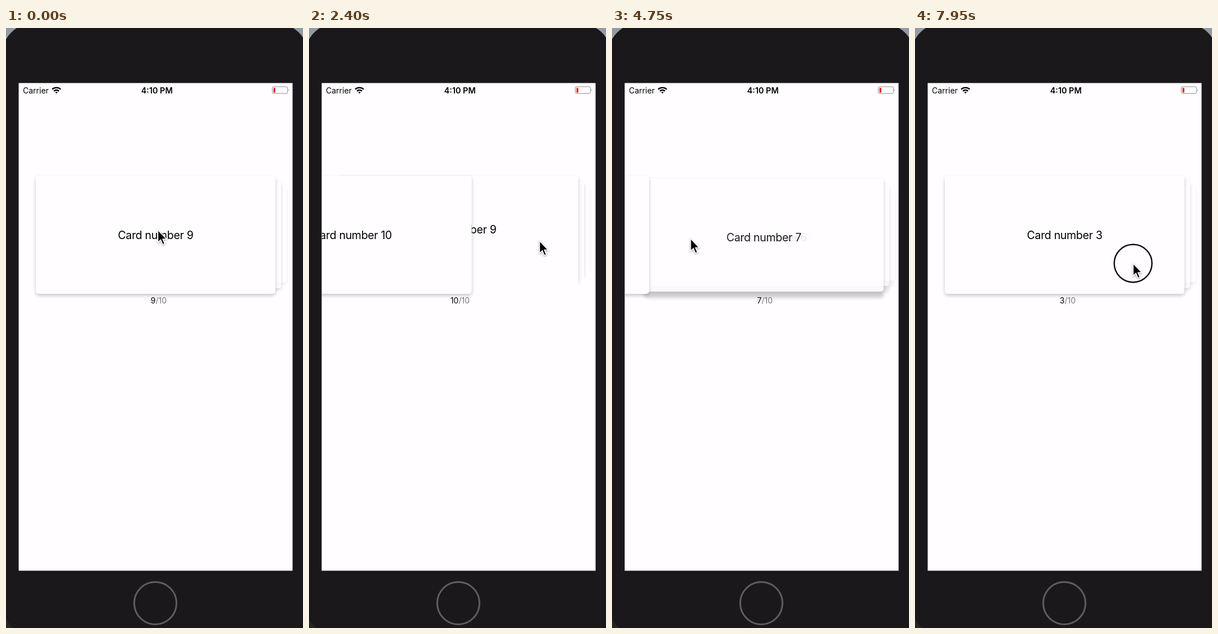
Write an HTML page that moves like this. It is 527 by 1063 pixels and loops after 8000 ms.

```html
<!DOCTYPE html>
<html lang="en">
<head>
<meta charset="utf-8">
<title>Card stack</title>
<style>
  html, body { margin: 0; width: 527px; height: 1063px; overflow: hidden; background: #1a181b; }
  body { position: relative; font-family: Inter, sans-serif; color: #000; }
  svg { position: absolute; left: 0; top: 0; }
  #screen { position: absolute; left: 23px; top: 98px; width: 485px; height: 863px; overflow: hidden; }
  .card, .card * { position: absolute; left: 0; top: 0; width: 425px; border-radius: 5px; }
  .shade { background: #000; opacity: .22; filter: blur(3px); margin-top: 3px; }
  .face { background: #fffdff; }
  .card .label { height: 24px; line-height: 24px; margin-top: -11.5px; text-align: center;
    font-size: 19.5px; letter-spacing: -.32px; }
  #counter { position: absolute; right: 223px; top: 375px; line-height: 20px; font-size: 14px; }
  #counter span { color: #777; }
</style>
</head>
<body>
<svg width="527" height="1063">
  <path d="M0 0H19Q7 8 0 20ZM527 0H509Q520 6 527 17Z" fill="#929ba5"/>
  <path d="M0 1046Q4 1056 13 1063H0Z" fill="#24271f"/>
  <rect x="22.5" y="97.5" width="486" height="864" fill="#fffdff"/>
  <circle cx="265" cy="1019" r="37.5" fill="none" stroke="#5f5d60" stroke-width="3"/>
</svg>
<div id="screen"><div id="counter"><b style="font-weight:400"></b><span>/10</span></div></div>
<svg width="527" height="1063">
  <g font-size="14">
    <text x="30" y="116">Carrier</text>
    <text x="267.7" y="116" text-anchor="middle" font-size="14.4" font-weight="600">4:10 PM</text>
  </g>
  <path d="M82 108.6A11 11 0 0 1 97 108.6M85 111.8A6.6 6.6 0 0 1 94 111.8"
    fill="none" stroke="#000" stroke-width="2.4"/>
  <path d="M87.2 113.8Q89.5 112 91.8 113.8L89.5 116.3Z"/>
  <rect x="472.5" y="104" width="27" height="12" rx="2.5" fill="none" stroke="#8b8a8c"/>
  <rect x="474.5" y="106" width="3.5" height="8.5" rx="1" fill="#e5302c"/>
  <path d="M501 108q2 2 0 4Z" fill="#8b8a8c"/>
  <g id="pointer">
    <circle id="ring" r="33.5" fill="none" stroke="#0c0a0d" stroke-width="2.4"/>
    <path d="M0 0V22.2L5 17.6L8.6 26L12.2 24.4L8.7 16.3H15.4Z" fill="#000" stroke="#fff"
      stroke-width="1.6" style="filter:drop-shadow(0 1.5px 1.5px #0006)"/>
  </g>
</svg>
<script>
const LOOP = 8000, SETTLE = 300, OFF = -485, COUNT = 10, FIRST = 9, FINAL_PRESS = 7925;
const HOME = { x: 30, y: 164, h: 209 }, STEP = 10;
const $ = id => document.getElementById(id);
const clamp = v => Math.min(1, Math.max(0, v));
const ease = v => { v = clamp(v); return v * v * (3 - 2 * v); };
const easeOut = v => 1 - (1 - clamp(v)) ** 2;
const mix = (a, b, v) => a + (b - a) * v;

const dismiss = (release, from, to, y) => ({ step: -1, press: release - 230, release, from, to, y });
const bringBack = release => ({ step: 1, press: release - 400, release, from: 114, to: 409, y: 377 });

// One dismissal, two cards brought back, then a steady run whose last two swipes stop short
const swipes = [
  dismiss(480, 285, -14, 357), bringBack(1500), bringBack(2390),
  ...Array.from({ length: 7 }, (_, n) => dismiss(
    3320 + 630 * n, 332 + 44 * Math.cos((n - 5) * Math.PI / 3), n < 5 ? -13 : 102, 373)),
];

// Between swipes the pointer waits, then hurries to the next starting place
const track = [{ t: -50, x: 264, y: 358 }];
for (const { press, release, from, to, y } of swipes) track.push(
  { ...track.at(-1), t: press - 270 }, { t: press - 120, x: from, y },
  { t: press, x: from, y }, { t: release, x: to, y });
track.push({ ...track.at(-1), t: 7230 }, { t: 7390, x: 502, y: 398 },
  { t: FINAL_PRESS, x: 387, y: 417 }, { t: LOOP, x: 387, y: 417 });

function pointerAt(t) {
  const i = track.findIndex(p => p.t > t), a = track[i - 1], b = track[i];
  const v = easeOut((t - a.t) / (b.t - a.t));
  return { x: mix(a.x, b.x, v), y: mix(a.y, b.y, v) };
}

const cards = Array.from({ length: COUNT }, (_, i) => {
  const root = document.createElement('div');
  root.className = 'card';
  root.innerHTML = `<div class="shade"></div><div class="face"></div><div class="label">Card number ${i + 1}</div>`;
  $('screen').append(root);
  const [shade, face, label] = root.children;
  return { root, shade, face, label };
});

// depth is the animated place in the stack, rank the place it settles in
function place({ root, shade, face, label }, dx, depth, rank) {
  const alpha = clamp(1 - depth / 3), height = HOME.h - 2 * STEP * rank;
  root.style.display = alpha && dx > OFF ? '' : 'none';
  root.style.opacity = alpha;
  root.style.transform = `translate(${HOME.x + dx + STEP * depth}px,${HOME.y + STEP * depth}px)`;
  shade.style.height = height + 'px';
  face.style.height = HOME.h - 2 * STEP * depth + 'px';
  label.style.top = height / 2 + 'px';
}

function draw(t) {
  const pointer = pointerAt(t);
  const done = swipes.filter(s => s.release <= t), last = done.at(-1);
  const drag = swipes.find(s => t >= s.press && t < s.release);
  const top = done.reduce((sum, s) => sum + s.step, FIRST);
  const left = last ? 1 - ease((t - last.release) / SETTLE) : 0;
  const shift = last ? left * last.step : 0;

  cards.forEach((card, i) => {
    const n = i + 1, rank = Math.max(0, top - n);
    const thrown = last && n === (last.step < 0 ? top + 1 : top);
    let dx = n > top ? OFF : 0;
    if (thrown) {
      const released = last.to - last.from + (last.step > 0 ? OFF : 0);
      dx = mix(dx, released, left);
    }
    if (drag && n === (drag.step < 0 ? top : top + 1)) dx += pointer.x - drag.from;
    place(card, dx, thrown || n > top ? 0 : rank - shift, rank);
  });

  $('counter').firstChild.textContent = top;
  $('pointer').setAttribute('transform', `translate(${pointer.x},${pointer.y})`);
  $('ring').style.display = drag || t >= FINAL_PRESS ? '' : 'none';
}

function tick() {
  draw(performance.now() % LOOP);
  requestAnimationFrame(tick);
}
tick();
</script>
</body>
</html>
```
